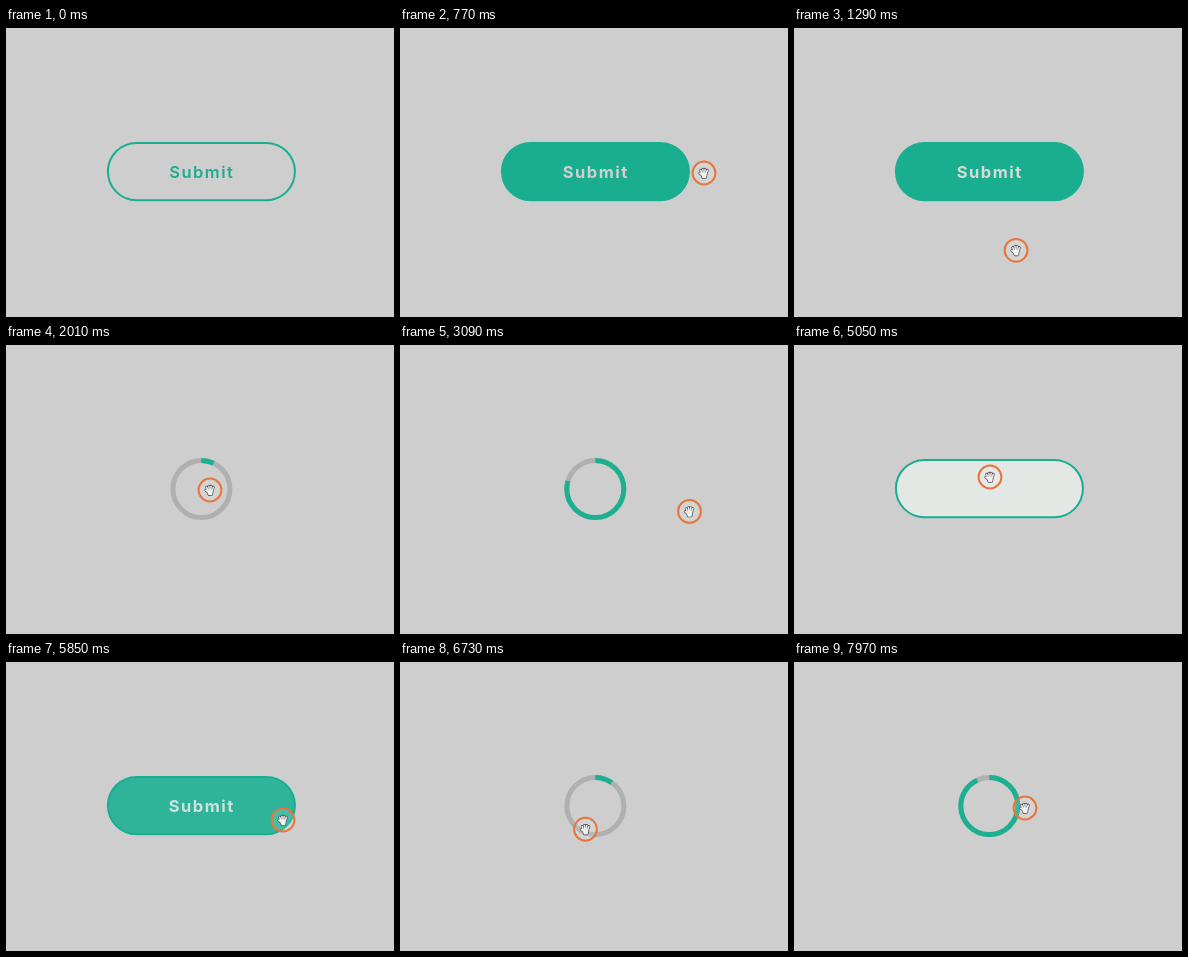
An HTML page for the animation above (8 s loop, 388 by 289 pixels).

```html
<!DOCTYPE html>
<html lang="en">
<head>
<meta charset="utf-8">
<title>Submit button</title>
<style>
  html, body { margin: 0; width: 100%; height: 100%; overflow: hidden; background: #cecece; }
  svg { display: block; width: 100%; height: 100%; }
  text { font-family: Inter, "Open Sans", sans-serif; font-size: 16.5px; letter-spacing: 1.5px; text-anchor: middle; }
  path { fill: none; stroke-linecap: round; stroke-linejoin: round; }
</style>
</head>
<body>
<svg viewBox="0 0 388 289">
  <rect id="button"/>
  <circle id="progress" cx="195.3" cy="144" r="28.5" fill="none" stroke="#1cb092" stroke-width="5"
          pathLength="100" transform="rotate(-90 195.3 144)"/>
  <text id="label" x="195.8" y="150.2">Submit</text>
  <path id="check" d="M185.5 147.5 L192 153 L206.5 136.5" stroke="#d3d8d4" stroke-width="4.4"/>
  <g id="pointer">
    <circle r="11.4" fill="#fff" fill-opacity=".12" stroke="#e6763c" stroke-width="2"/>
    <path id="handEdge" stroke="#444" stroke-width="2.8"/>
    <path id="handFill" stroke="#f2f2f2" stroke-width="1.5"/>
  </g>
</svg>
<script>
const LOOP = 8000, ENTER = 410;
const GREEN = [26, 174, 144], PAGE = [206, 206, 206], PALE = [228, 232, 229], GREY = [176, 176, 176], LIGHT = [214, 219, 215];
const $ = id => document.getElementById(id);

// Two rounds of hover and press; the first also plays through to success and reset.
const rounds = [
  { hover: 440, press: 1600, idle: PAGE },
  { hover: 5600, press: 6280, idle: PALE }
];
const SUCCESS = 3520, RESET = 4660;

// Places where the pointer turns
const stops = [
  { t: ENTER, x: 400, y: 152 }, { t: 770, x: 304, y: 145 }, { t: 1400, x: 215, y: 229 },
  { t: 2010, x: 204, y: 145 }, { t: 3300, x: 296, y: 168 }, { t: 3890, x: 268, y: 182 },
  { t: 5050, x: 196, y: 132 }, { t: 5850, x: 277, y: 158 }, { t: 7130, x: 158, y: 170 },
  { t: 7970, x: 231, y: 146 }
];

const span = (t, start, length) => Math.max(0, Math.min(1, (t - start) / length));
const ease = (t, start, length = 300) => { const p = span(t, start, length); return p * p * (3 - 2 * p); };
const lerp = (a, b, p) => a + (b - a) * p;
const mix = (a, b, p) => a.map((v, i) => lerp(v, b[i], p));
const rgb = c => `rgb(${c.map(Math.round)})`;

function set(id, attrs) {
  for (const name in attrs) $(id).setAttribute(name, attrs[name]);
}

// Four fingers fanning out above a rounded palm
function drawHand() {
  let d = 'M-2 2 H2 L1.5 4.5 H-1 Z M-1 3.2 H1 M-2 2 L-4.2 .2';
  for (let i = 0; i < 4; i++) {
    const side = i - 1.5;
    d += `M${side * 1.2} 2 L${side * 2.2} ${Math.abs(side) - 4.3}`;
  }
  set('handEdge', { d });
  set('handFill', { d });
}

function pointerAt(t) {
  const next = stops.findIndex(s => s.t > t);
  if (next < 1) return next ? stops[stops.length - 1] : stops[0];
  const a = stops[next - 1], b = stops[next], p = ease(t, a.t, b.t - a.t);
  return { x: lerp(a.x, b.x, p), y: lerp(a.y, b.y, p) };
}

function draw(t) {
  const second = t > 5500;
  const round = rounds[second ? 1 : 0];
  const hover = ease(t, round.hover, 315);
  const shrink = ease(t, round.press);
  const expand = second ? 0 : ease(t, SUCCESS);
  const reset = second ? 0 : ease(t, RESET);
  const back = second ? 0 : ease(t, RESET + 430);
  const small = shrink * (1 - expand);

  let fill = mix(mix(round.idle, GREEN, hover), PAGE, shrink);
  fill = mix(mix(fill, GREEN, expand), PALE, reset);
  const stroke = lerp(2, 5, small);
  const width = lerp(189, 62, small) - stroke, height = lerp(59.4, 62, small) - stroke;
  set('button', {
    x: 195.4 - width / 2, y: lerp(143.6, 144, small) - height / 2, width, height, rx: height / 2,
    fill: rgb(fill), stroke: rgb(mix(GREEN, GREY, small)), 'stroke-width': stroke
  });

  const done = 100 * span(t, round.press + 305, 1490);
  set('progress', { 'stroke-dasharray': `${done} 200`, opacity: done > 0 && expand === 0 ? 1 : 0 });

  const light = back > 0 ? 0 : hover;
  set('label', {
    fill: rgb(mix(GREEN, mix(round.idle, LIGHT, ease(t, round.hover + 250)), light)),
    'font-weight': light > .5 ? 700 : 600,
    opacity: Math.max(1 - ease(t, round.press, 160), back)
  });
  set('check', { opacity: second ? 0 : ease(t, SUCCESS + 160, 180) * (1 - reset) });

  const { x, y } = pointerAt(t);
  set('pointer', { transform: `translate(${x} ${y})`, opacity: t >= ENTER ? 1 : 0 });
}

drawHand();
const began = performance.now();
function tick() {
  draw((performance.now() - began) % LOOP);
  requestAnimationFrame(tick);
}
tick();
</script>
</body>
</html>
```
